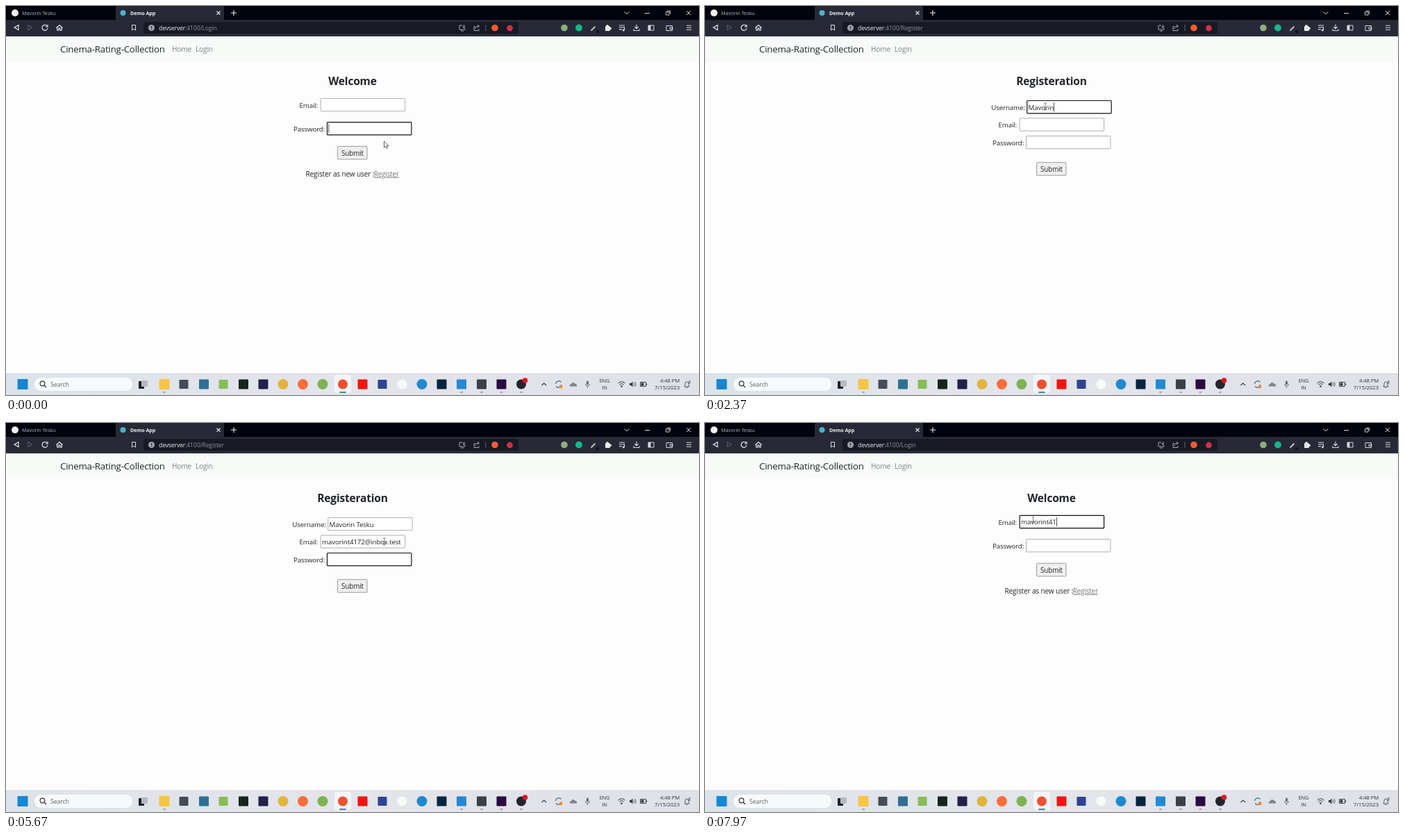
An HTML page that plays this animation: 998x561 px, repeating every 8 s.

```html
<!DOCTYPE html>
<html lang="en">
<head>
<meta charset="utf-8">
<title>Sign-up form</title>
<style>
  html, body { margin: 0; width: 100%; height: 100%; overflow: hidden; background: #fdfdfd; }
  svg { display: block; width: 100%; height: 100%; }
  text { font-family: "Open Sans", "Noto Sans", sans-serif; letter-spacing: -.015em; white-space: pre; }
</style>
</head>
<body>
<svg id="stage" viewBox="0 0 998 561"></svg>
<script>
const LOOP = 8000;
const INK = '#212529', GREY = '#7d8084', LIGHT = '#d8d9df', DARK = '#33363c';

const text = (x, y, size, str, fill = INK, more = '') =>
  `<text x="${x}" y="${y}" font-size="${size}" fill="${fill}" ${more}>${str}</text>`;
const rect = (x, y, w, h, fill, r = 0, more = '') =>
  `<rect x="${x}" y="${y}" width="${w}" height="${h}" fill="${fill}" rx="${r}" ${more}/>`;
const dot = (x, y, r, fill) => `<circle cx="${x}" cy="${y}" r="${r}" fill="${fill}"/>`;
const line = (d, color = LIGHT, w = 1) =>
  `<path d="${d}" fill="none" stroke="${color}" stroke-width="${w}"/>`;
const solid = (d, fill) => `<path d="${d}" fill="${fill}"/>`;
const tile = (x, y, s, fill) => rect(x - s / 2, y - s / 2, s, s, fill, 1);

function browser() {
  return rect(0, 0, 998, 20, '#02030d') +
    rect(158, 0, 156, 24, '#272936', 2) +
    rect(0, 20, 998, 23.5, '#272936') +
    rect(0, 42.5, 998, 1, '#181a24') +
    rect(198, 23, 540, 17, '#171923', 3) +
    // tabs
    dot(13, 10, 5, '#f2f2f2') + text(23, 12.8, 7.4, 'Mavorin Tesku', '#b4b5bd') +
    dot(168.5, 10, 4, '#4db3cc') + text(179, 12.8, 7.2, 'Demo App', '#f2f2f5', 'font-weight="700"') +
    line('M303.5 7.5l5 5m0-5l-5 5M324 10h8m-4-4v8', '#f0f0f3', 1.1) +
    line('M890.5 8.5l3.5 3 3.5-3M920 10.5h7M980 7l6 6m0-6l-6 6') +
    line('M950.5 8.5h4.5v4.5h-4.5zM952 7h4.5v4.5', LIGHT, .9) +
    // navigation
    line('M18 27.5v7l-6-3.5z', '#f0f0f3', 1.1) + line('M32 27.5v7l6-3.5z', '#62646f', 1) +
    line('M59 28.5a4 4 0 1 0 1 3.5M60 27v3h-3', '#f0f0f3', 1.2) +
    line('M72.5 31.5l4.5-4 4.5 4M73.8 30.5v4.5h2.2v-3h2v3h2.2v-4.5', '#f0f0f3', 1.1) +
    line('M181.5 27.5h5v7.5l-2.5-2-2.5 2z') +
    dot(209.5, 31.5, 4.5, '#a0a2aa') + rect(209, 29, 1.1, 3, '#171923') + rect(209, 33, 1.1, 1.1, '#171923') +
    // address bar tools
    line('M657 28h-4v6h8v-2M655 36h4M659.5 27v4m-2-1.5l2 2 2-2', '#b9bac2', .9) +
    line('M676 29.5h-2v6h7v-2.5M676 33q0-4 5-4m-2-2l2.5 2-2.5 2', '#b9bac2', .9) +
    rect(690.5, 27, .8, 9, '#6e707a') +
    dot(704, 31.5, 4.8, '#f25b34') + dot(725.5, 32, 4.4, '#d02f4c') +
    // extensions and menus
    dot(804, 31.5, 4.8, '#8fae7c') + dot(825, 31.5, 4.9, '#17b78b') +
    line('M842.5 35.5l6-6', '#c5c6cc', 1.8) + rect(850, 35, 4, 4, '#101219', 1) +
    rect(863, 29, 7, 7, '#e8e8ec', 1) + dot(866, 28.6, 1.7, '#e8e8ec') + dot(870.3, 32.2, 1.7, '#e8e8ec') +
    line('M883 28h8M883 30.8h8M883 33.6h4M890.5 30v5', LIGHT, 1.1) + dot(889.3, 35, 1.4, LIGHT) +
    line('M908 26.5v6m-2.7-2.5l2.7 2.7 2.7-2.7M904 33v2.5h8v-2.5', LIGHT, 1.1) +
    line('M925 28h8v7h-8z') + rect(925, 28, 3.5, 7, LIGHT) +
    line('M951 28.5h8.5v7h-8.5zM956 31h4v2.4h-4z') +
    line('M980 28.3h7M980 31.3h7M980 34.3h7', LIGHT, 1.1);
}

// x, size, colour, round?
const APPS = [
  [24, 15, '#1687d3'], [228, 15, '#f6c544'], [256, 13, '#454b58'], [285, 14, '#2f6f94'],
  [313, 13, '#86bd55'], [342, 14, '#16251b'], [370.5, 14, '#23204a'], [399, 15, '#e3b43b', 1],
  [427.5, 15, '#fb6d3c', 1], [456, 15, '#7db252', 1], [485, 14, '#f0502f', 1], [513.5, 14, '#f5130f'],
  [542, 13, '#2e4392'], [570.5, 14, '#f8faf8', 1], [599, 15, '#2089cf', 1], [627.5, 14, '#08253f'],
  [656, 14, '#2489d2'], [685, 14, '#3b3f46'], [713.5, 14, '#2b0a42'], [742, 14, '#23252a', 1]
];

function taskbar() {
  let s = rect(0, 530, 998, 31, 'url(#bar)') + rect(0, 529.7, 998, .7, '#c6cad2') +
    rect(40.5, 535.5, 142, 20, '#f8f9fb', 10, 'stroke="#d8dce3" stroke-width=".6"') +
    `<circle cx="52.5" cy="544.5" r="3.4" fill="none" stroke="${DARK}" stroke-width="1.2"/>` +
    line('M55 547l3 3', DARK, 1.3) + text(64, 548.9, 8.8, 'Search', '#606469') +
    rect(191, 541, 8, 11, '#202226', 1) + rect(195, 540, 9, 9, '#b7bbc1', 1) +
    rect(473, 532, 24, 26, '#f3f5f8', 3);
  for (const [x, size, fill, round] of APPS)
    s += round ? dot(x, 545.5, size / 2, fill) : tile(x, 545.5, size, fill);
  s += dot(747.5, 540, 3.8, '#e0151f');
  for (const x of [228, 656, 685, 713.5, 742]) s += rect(x - 2, 556.3, 4, 1.5, '#8b9097', .7);
  s += rect(480, 556.2, 10, 1.7, '#2d7f8f', .8);
  // tray
  s += line('M771.5 547l3.3-3 3.3 3', DARK, 1.1) +
    line('M791.5 545a4.5 4.5 0 0 1 8-2.5M800 546a4.5 4.5 0 0 1-8 2.5', '#4c7a98', 1.3) + dot(799, 549, 2.4, '#ec8a31') +
    solid('M812 548.5q-1-3 2-3.2 2-4 5-.8 3.5 0 3 4z', '#7c8488') +
    rect(836, 540.5, 3, 6, '#666b71', 1.5) + line('M834.5 545q0 3.5 3 3.5t3-3.5M837.5 548.5v2.5', '#666b71', .9) +
    text(862, 543.3, 7.4, 'ENG', DARK, 'text-anchor="middle"') +
    text(862, 553.3, 7.4, 'IN', DARK, 'text-anchor="middle"') +
    line('M881.5 544q5-4.5 10 0M883.3 546q3.2-3 6.4 0', DARK, 1) + dot(886.5, 548.5, 1.3, DARK) +
    solid('M898 544h2l2.5-2.5v8l-2.5-2.5h-2z', DARK) +
    line('M904 543.5q1.5 2 0 4M905.8 542q3 3.5 0 7', DARK, .8) +
    line('M913.5 542.5h8v6h-8z', DARK, .9) + rect(914.5, 543.5, 4, 4, DARK) + rect(922, 544.5, 1.2, 2, DARK) +
    text(970, 543.3, 7.7, '4:48 PM', DARK, 'text-anchor="end"') +
    text(970, 553.3, 7.8, '7/15/2023', DARK, 'text-anchor="end"') +
    line('M977 549q1-1 1-4 0-3 2.5-3t2.5 3q0 3 1 4zM979.5 550.5h2M983 541h2.5l-2.5 3h2.5', DARK, .8);
  return s;
}

const FIELDS = {
  lmail: { page: 'Login', label: 'Email:', lx: 422.5, x: 453.2, y: 133.4 },
  lpass: { page: 'Login', label: 'Password:', lx: 414, x: 462.5, y: 167.6 },
  user: { page: 'Register', label: 'Username:', lx: 412.3, x: 463.8, y: 136.5 },
  mail: { page: 'Register', label: 'Email:', lx: 422.5, x: 453.2, y: 161.9 },
  pass: { page: 'Register', label: 'Password:', lx: 414, x: 462.5, y: 187.5 }
};
const BOX_W = 121.4, BOX_H = 18.3;

function fields(page) {
  let s = '';
  for (const [key, f] of Object.entries(FIELDS)) if (f.page === page)
    s += text(f.lx, f.y + 13.1, 9.75, f.label) +
      rect(f.x, f.y, BOX_W, BOX_H, '#fff', 1, `id="${key}Box"`) +
      text(f.x + 1.8, f.y + 13, 9.75, '', INK, `id="${key}Text" clip-path="url(#${key}Clip)"`);
  return s;
}
const submit = y => rect(477.6, y, 42.4, 18.6, '#efefef', 1, 'stroke="#858585" stroke-width=".8"') +
  text(499, y + 13.1, 9.9, 'Submit', INK, 'text-anchor="middle"');
const heading = str => text(499, 114, 15.6, str, INK, 'text-anchor="middle" font-weight="700"');

const clips = Object.entries(FIELDS).map(([key, f]) =>
  `<clipPath id="${key}Clip">${rect(f.x + 1, f.y, BOX_W - 2, BOX_H, '#000')}</clipPath>`).join('');

document.getElementById('stage').innerHTML =
  `<defs>${clips}<linearGradient id="bar"><stop stop-color="#dde3eb"/><stop offset=".5" stop-color="#e3e5ea"/>
   <stop offset="1" stop-color="#dfe1e7"/></linearGradient></defs>` +
  rect(0, 0, 998, 561, '#fdfdfd') + rect(0, 43, 998, 37.5, '#f8faf8') +
  browser() +
  `<text x="220" y="34.6" font-size="8.6" fill="#ececf0">devserver<tspan id="path" fill="#8f919b"></tspan></text>` +
  text(78, 66.8, 13.25, 'Cinema-Rating-Collection') +
  text(239, 66, 10.1, 'Home', GREY) + text(273, 66, 10.1, 'Login', GREY) +
  `<g id="Login">${heading('Welcome')}${fields('Login')}${submit(202.4)}` +
  text(431.5, 245.8, 10.1, 'Register as new user :') +
  text(529.7, 245.8, 9.9, 'Register', '#74777b', 'text-decoration="underline"') + '</g>' +
  `<g id="Register">${heading('Registeration')}${fields('Register')}${submit(225.7)}</g>` +
  rect(0, 0, .8, 13, '#222', 0, 'id="caret"') +
  taskbar() +
  `<path id="arrow" d="M0 0v9.2l2.1-1.9 1.5 3 1.5-.7-1.4-2.9h2.9z" fill="#fff" stroke="#333" stroke-width=".8"/>` +
  `<path id="beam" d="M-2-5h1.5l.5.5.5-.5h1.5M0-4.5v9M-2 5h1.5l.5-.5.5.5h1.5" fill="none" stroke="#55565a" stroke-width=".8"/>`;

const $ = id => document.getElementById(id);

const PAGES = [[0, 'Login'], [450, 'Register'], [7000, 'Login']];
const FOCUS = [[0, 'lpass'], [450, ''], [790, 'user'], [2980, 'mail'], [4150, 'pass'],
  [4980, 'mail'], [5560, 'pass'], [6400, ''], [7310, 'lmail']];
const CARET_OFF = [[300, 450], [1270, 1470], [4480, 4980], [5620, 5740]];
const MAIL = 'mavorint4172@inbox.test', NAME = 'Mavorin Tesku';
// field, start, end, string, characters shown from and to
const TYPING = [
  ['user', 840, 1220, 'mavorin', 0, 7], ['user', 1480, 1760, 'mavorin', 7, 0],
  ['user', 1860, 2290, NAME, 0, 7], ['user', 2520, 2900, NAME, 7, 13],
  ['mail', 3080, 4050, MAIL, 0, 12], ['mail', 5040, 5480, MAIL, 12, 23],
  ['pass', 5740, 6200, 'password', 0, 8], ['lmail', 7440, 7940, MAIL, 0, 10]
];
const MOUSE = [[0, 544.5, 195], [120, 544.5, 195], [370, 547, 241], [470, 547, 241], [760, 490, 145],
  [4640, 490, 145], [4920, 545, 171], [5950, 545, 171], [6350, 508, 317.5], [6720, 508, 317.5],
  [6900, 498, 236], [7010, 498, 236], [7280, 472.5, 138]];

const latest = (list, t) => list.filter(k => k[0] <= t).pop()[1];

function mouseAt(t) {
  const i = MOUSE.findIndex(k => k[0] > t);
  if (i < 0) return MOUSE[MOUSE.length - 1].slice(1);
  const [t0, x0, y0] = MOUSE[i - 1], [t1, x1, y1] = MOUSE[i];
  const u = (t - t0) / (t1 - t0), e = u * u * (3 - 2 * u);
  return [x0 + (x1 - x0) * e, y0 + (y1 - y0) * e];
}

function valueOf(key, t) {
  const run = TYPING.filter(r => r[0] === key && r[1] <= t).pop();
  if (!run) return '';
  const [, t0, t1, str, from, to] = run;
  const u = Math.min(1, (t - t0) / (t1 - t0));
  return str.slice(0, Math.round(from + (to - from) * u));
}

function draw(t) {
  const page = latest(PAGES, t), focus = latest(FOCUS, t), [mx, my] = mouseAt(t);
  let over = false;
  $('path').textContent = ':4100/' + page;
  for (const id of ['Login', 'Register']) $(id).style.display = id === page ? '' : 'none';

  for (const [key, f] of Object.entries(FIELDS)) {
    if (f.page !== page) continue;
    const box = $(key + 'Box'), on = key === focus;
    box.setAttribute('stroke', on ? '#101010' : '#9a9a9a');
    box.setAttribute('stroke-width', on ? 1.2 : .8);
    $(key + 'Text').textContent = valueOf(key, t);
    over = over || (mx > f.x && mx < f.x + BOX_W && my > f.y && my < f.y + BOX_H);
  }

  const blank = !focus || CARET_OFF.some(([a, b]) => t >= a && t < b);
  $('caret').style.display = blank ? 'none' : '';
  if (!blank) {
    const f = FIELDS[focus], w = $(focus + 'Text').getComputedTextLength();
    $('caret').setAttribute('x', Math.min(f.x + 2 + w, f.x + BOX_W - 2));
    $('caret').setAttribute('y', f.y + 2.7);
  }

  $('arrow').style.display = over ? 'none' : '';
  $('beam').style.display = over ? '' : 'none';
  $(over ? 'beam' : 'arrow').setAttribute('transform', `translate(${mx} ${my})`);
}

const start = performance.now();
function tick() {
  draw((performance.now() - start) % LOOP);
  requestAnimationFrame(tick);
}
tick();
</script>
</body>
</html>
```
